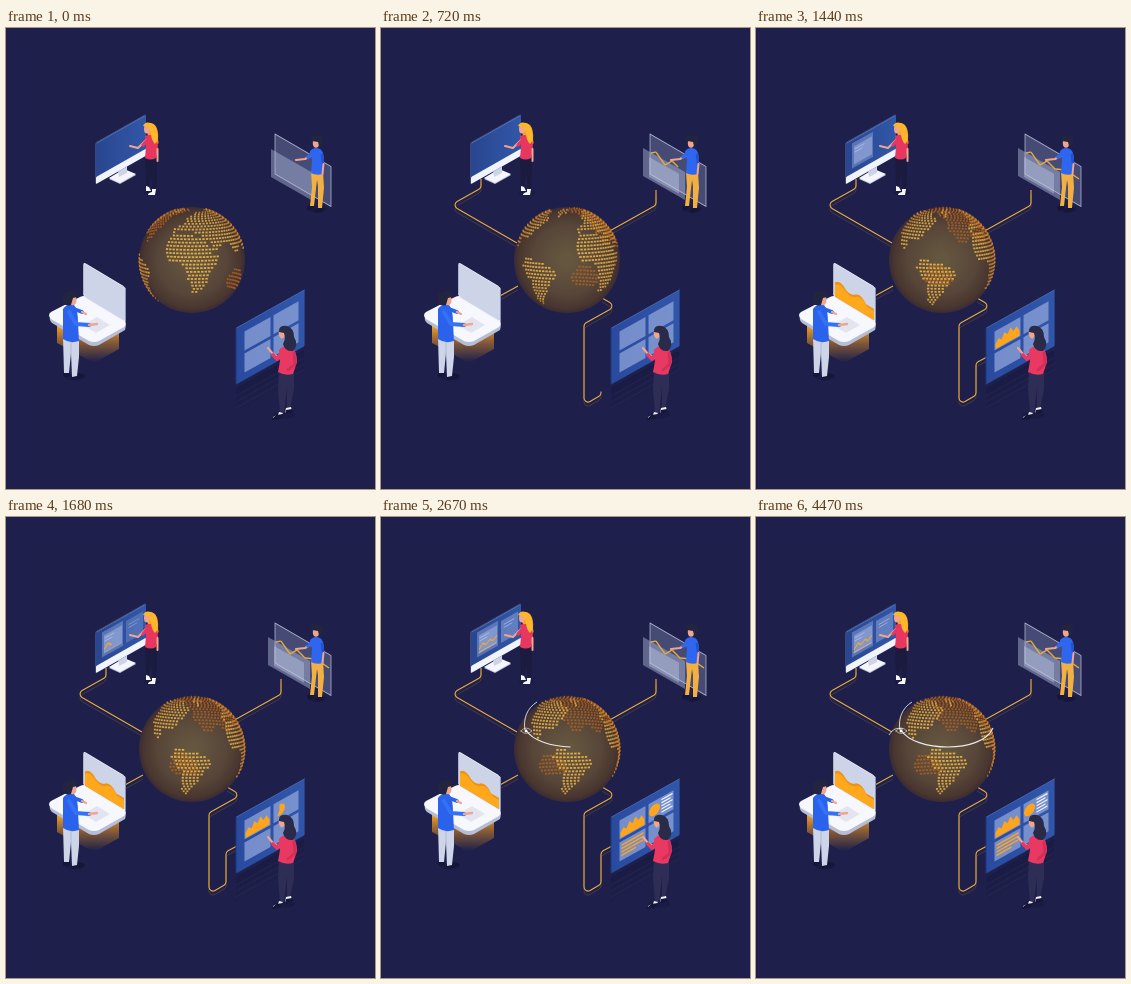
An HTML page with a canvas for the animation above (4.5 s loop, 369x461 px).

```html
<!DOCTYPE html>
<html lang="en">
<head>
<meta charset="utf-8">
<title>Connected globe</title>
<style>
html, body { margin: 0; width: 100%; height: 100%; overflow: hidden; background: #1e204b; }
canvas { display: block; }
</style>
</head>
<body>
<canvas id="stage" width="369" height="461"></canvas>
<script>
const ctx = document.getElementById('stage').getContext('2d');
const LOOP = 4500, RAD = Math.PI / 180;
const globe = { x: 186, y: 232, r: 53, tilt: 7 * RAD };
const amber = '#ffa51c', gold = '#e5aa3c', skin = '#f0a58f';
const hair = '#23243f', shoe = '#15163a', shade = 'rgba(14,15,48,.28)';

const progress = (t, from, to) => Math.min(1, Math.max(0, (t - from) / (to - from)));
const easeOut = p => 1 - (1 - p) * (1 - p);

function fill(color, d) {
  ctx.fillStyle = color;
  ctx.fill(new Path2D(d));
}
function line(color, width, d) {
  ctx.strokeStyle = color;
  ctx.lineWidth = width;
  ctx.stroke(new Path2D(d));
}
function oval(color, x, y, rx, ry = rx) {
  ctx.fillStyle = color;
  ctx.beginPath();
  ctx.ellipse(x, y, rx, ry, 0, 0, 7);
  ctx.fill();
}
function rect(color, x, y, w, h, r = 0) {
  ctx.fillStyle = color;
  ctx.beginPath();
  ctx.roundRect(x, y, w, h, r);
  ctx.fill();
}
function faded(alpha, draw) {
  if (alpha <= 0) return;
  ctx.save();
  ctx.globalAlpha *= alpha;
  draw();
  ctx.restore();
}
// Draws in the plane of an upright isometric panel.
function onPanel(x, y, slope, draw) {
  ctx.save();
  ctx.transform(1, slope, 0, 1, x, y);
  draw();
  ctx.restore();
}
// Lets a chart rise from its baseline.
function rising(baseline, height, draw) {
  if (!height) return;
  ctx.save();
  ctx.translate(0, baseline);
  ctx.scale(1, height);
  draw();
  ctx.restore();
}
function gradient(x0, y0, x1, y1, ...colors) {
  const g = ctx.createLinearGradient(x0, y0, x1, y1);
  colors.forEach((c, i) => g.addColorStop(i / (colors.length - 1), c));
  return g;
}
// Reveals the first `length` pixels of a polyline with rounded corners.
function trail(points, length, color, width, radius = 4) {
  if (length <= 0) return;
  ctx.save();
  ctx.lineCap = 'butt';
  ctx.setLineDash([length, 999]);
  ctx.beginPath();
  ctx.moveTo(...points[0]);
  for (let i = 1; i < points.length - 1; i++) ctx.arcTo(...points[i], ...points[i + 1], radius);
  ctx.lineTo(...points.at(-1));
  ctx.strokeStyle = color;
  ctx.lineWidth = width;
  ctx.stroke();
  ctx.restore();
}

// Land outlines as longitude, latitude pairs.
const land = [
  [-165,65, -130,71, -85,73, -60,55, -70,43, -82,30, -97,27, -97,18, -84,10, -105,20, -117,32, -125,48, -150,60],
  [-78,8, -52,4, -35,-7, -48,-27, -66,-54, -74,-50, -70,-18, -81,-4],
  [-55,82, -22,80, -25,70, -45,60, -55,70],
  [-16,16, -8,34, 11,37, 32,31, 43,12, 51,11, 38,-8, 34,-24, 20,-35, 9,0, 5,5, -8,5],
  [-9,37, -9,44, 2,50, 8,60, 25,71, 70,73, 110,76, 170,68, 140,55, 122,38, 120,25, 107,12, 100,14, 90,22, 78,8, 70,22, 57,26, 45,13, 35,32, 15,42],
  [114,-22, 131,-12, 142,-12, 153,-28, 140,-38, 116,-34]
];
function inside(p, lon, lat) {
  let hit = false;
  for (let i = 0, j = p.length - 2; i < p.length; j = i, i += 2) {
    const crosses = p[i + 1] > lat !== p[j + 1] > lat;
    if (crosses && lon < (p[j] - p[i]) * (lat - p[i + 1]) / (p[j + 1] - p[i + 1]) + p[i]) hit = !hit;
  }
  return hit;
}
const dots = [];
for (let lat = -54; lat <= 82; lat += 4) {
  const step = 4 / Math.cos(lat * RAD);
  for (let lon = -180; lon < 180; lon += step) {
    if (land.some(p => inside(p, lon, lat))) dots.push([lon * RAD, lat * RAD]);
  }
}

function drawGlobe(t) {
  const { x, y, r, tilt } = globe;
  const center = (18 - 83 * easeOut(progress(t, 0, 2400))) * RAD;
  const base = ctx.createRadialGradient(x, y, 6, x, y, r);
  base.addColorStop(0, '#65563f');
  base.addColorStop(.6, '#574639');
  base.addColorStop(.9, '#49362f');
  base.addColorStop(1, '#3a2b35');
  oval(base, x, y, r);
  const cosT = Math.cos(tilt), sinT = Math.sin(tilt);
  const project = ([lon, lat]) => {
    const d = lon - center, c = Math.cos(lat), s = Math.sin(lat);
    return {
      depth: sinT * s + cosT * c * Math.cos(d),
      px: x + r * c * Math.sin(d),
      py: y - r * (cosT * s - sinT * c * Math.cos(d))
    };
  };
  // The far side shows through, so it goes first.
  for (const { depth, px, py } of dots.map(project).sort((a, b) => a.depth - b.depth)) {
    const w = 1 + 1.5 * Math.abs(depth);
    ctx.globalAlpha = depth > 0 ? .65 + .35 * depth : .75;
    ctx.fillStyle = depth > .45 ? '#e3ae45' : depth > 0 ? '#cd8c36' : '#b9651f';
    ctx.fillRect(px - w / 2, py - .9, w, 1.8);
  }
  ctx.globalAlpha = 1;
}

const cables = [
  [[136,215], [70,177], [100,160], [100,151]],
  [[225,205], [275,177], [275,162]],
  [[137,258], [117,269]],
  [[221,270], [235,278], [203,296], [203,377], [220,367], [220,335], [231,329]]
];
function drawCables(t) {
  for (const c of cables) {
    ctx.save();
    ctx.translate(0, 4);
    trail(c, t * .2, 'rgba(140,100,55,.38)', 1);
    ctx.restore();
    trail(c, t * .2, gold, 1.15);
  }
}

function drawMonitor(t) {
  fill('#b9c2dc', 'M103 151L118 142L130 147L114 156Z');
  fill('#f5f6fc', 'M103 150L118 141L130 146L114 155Z');
  fill('#cdd4e8', 'M112 142L121 136L121 145L113 149Z');
  onPanel(90, 115, -.565, () => {
    rect('#3b4778', -1, -1, 51, 42, 2);
    rect(gradient(0, 0, 50, 0, '#29468f', '#3157a8'), 0, 0, 50, 35, 1);
    rect('#f2f4fb', 0, 34, 50, 7, 1);
    ctx.setLineDash([1, 1]);
    line('#6f86c1', .6, 'M1 .5H49');
    ctx.setLineDash([]);
    faded(progress(t, 1000, 1350), () => {
      rect('rgba(139,160,215,.5)', 6, 4, 21, 25);
      rect('rgba(185,202,240,.4)', 8, 8, 18, 18);
      line('#b9c8ec', .6, 'M9 11H18 M9 14H16');
    });
    faded(progress(t, 1450, 1800), () => {
      rect('rgba(139,160,215,.55)', 30, 6, 17, 22);
      line('#b4c4ea', .6, 'M33 11H43 M33 14H41');
    });
    const p = progress(t, 1550, 1880);
    trail([[8,22], [12,18], [15,21], [19,18], [22,21], [26,18]], p * 27, amber, 1.2, 0);
    faded(p, () => line('#efb45a', .8, 'M8 25H25'));
  });
}

function drawBlonde() {
  oval(shade, 146, 165, 8, 2.5);
  fill('#1b1b40', 'M139 128L151 128L151 145L150 162L147 162L145 145L143 159L140 158Z');
  fill('#f8f8fc', 'M140 158L143 159L145 163L140 163Z M146 161L150 161L149 167L142 167Q142 165 146 164Z');
  fill('#f5a51f', 'M139 97Q144 93 149 97Q153 102 152 112Q154 117 149 117L143 111Z');
  fill('#e7375f', 'M139 108Q143 106 148 108Q152 111 152 121L150 130Q145 133 139 130L140 119Z');
  line(skin, 2, 'M140 112L132 120L124 118');
  line('#e7375f', 3.2, 'M142 111L137 117');
  line(skin, 2, 'M151.5 121L151.5 133');
  oval(skin, 141, 101, 3, 4.5);
  fill('#ffb52c', 'M137 98Q139 93 145 95Q150 97 151 104Q153 113 149 116Q145 112 145 105Q144 100 141 99Z');
}

function drawGlass(t) {
  onPanel(269, 106, .58, () => {
    rect('rgba(154,166,204,.32)', 0, 0, 56, 40, 1);
    line('rgba(224,230,247,.7)', .8, 'M0 0H56V40H0Z');
  });
  const shift = 3 * easeOut(progress(t, 250, 600));
  onPanel(265 - shift, 121 - shift * .3, .57, () => rect('rgba(176,187,219,.45)', 0, 0, 42, 28));
  faded(progress(t, 300, 650), () => {
    onPanel(268, 129, .56, () => rect('rgba(194,204,231,.4)', 0, 0, 30, 20));
  });
  const p = progress(t, 420, 980);
  trail([[270,125], [275,124], [284,137], [291,133], [299,141], [310,142], [323,151]], p * 68, gold, 1.4, 1);
}

function drawGlassMan() {
  oval(shade, 311, 181, 10, 3.5);
  fill(shoe, 'M301 178L308 177L308 181Q304 183 301 181Z M309 181L316 179L318 182Q313 186 308 184Z');
  fill('#f2af42', 'M305 143L317 143L318 160L316 180L312 180L312 158L311 152L308 178L304 178L306 159Z');
  line(skin, 2.2, 'M306 127L299 131L290 132');
  fill('#2f66ef', 'M304 123Q308 118 314 121Q318 123 318 133L317 146Q310 148 305 145L306 132Z');
  line('#2f66ef', 3.6, 'M306 125L302 129');
  line('#2452cb', 2.6, 'M316 127L317 135');
  line(skin, 2, 'M317.5 136L316.5 146');
  oval(skin, 310, 115, 3.2, 4.8);
  fill(hair, 'M305 113Q304 107 311 107Q318 107 317 114Q316 119 313 118L312 114L306 113Z');
}

function drawDesk(t) {
  const glow = gradient(0, 298, 0, 334, 'rgba(250,169,38,.95)', 'rgba(240,150,34,.45)', 'rgba(240,150,34,0)');
  fill(glow, 'M51 294L88 315L113 301L113 321L88 335L51 315Z');
  fill('#b6bed7', 'M45 286L74 271Q78 269 82 271L118 293Q121 296 119 302L93 317Q88 319 83 317L46 295Q42 292 45 286Z');
  fill('#f7f8fd', 'M45 284L74 269Q78 267 82 269L117 291Q122 295 118 299L93 313Q88 315 83 313L45 291Q41 287 45 284Z');
  fill('#e2e5f0', 'M77 297L91 289L104 297L90 305Z');
  onPanel(78, 235, .6, () => {
    rect('#f1f3fb', -.7, -.7, 42.4, 35.4, 3);
    rect('#8794b8', 41, 0, 1, 34, 1);
    rect('#cdd4e8', 0, 0, 41, 33.5, 2);
    rising(33, easeOut(progress(t, 780, 1320)), () => {
      fill('#ee9214', 'M1 0V-14Q6 -20 11 -14Q16 -9 22 -15Q28 -18 32 -11L40 -11V0Z');
      fill('#ffa81c', 'M1 0V-12Q6 -17 11 -12Q17 -7 23 -13Q29 -16 33 -9L40 -9V0Z');
    });
  });
}

function drawDeskMan() {
  oval(shade, 69, 349, 10, 3.5);
  fill(shoe, 'M57 344L64 344L64 348Q59 350 57 348Z M65 348L73 345L79 347Q77 351 66 352Z');
  fill('#ced5e8', 'M57 309L73 309L73 329L71 348L66 349L65 325L63 345L58 345Z');
  line('#a9b4d1', .8, 'M65 314L65 326');
  line('#2863e8', 3.8, 'M68 281L76 284');
  line(skin, 2.2, 'M76 284L80 286');
  fill('#2a62ec', 'M57 281Q61 275 68 277Q72 281 72 295L73 313Q64 316 57 311Z');
  line('#3471f6', 4, 'M63 284L70 296L83 297');
  line(skin, 2.4, 'M83 297L91 296');
  oval(skin, 67, 272, 3.6, 5.2);
  fill(hair, 'M57 269Q56 263 65 263Q73 262 71 269L67 270L65 277Q59 279 57 274Z');
}

function drawBoard(t) {
  onPanel(230, 360, -.56, () => {
    rect(gradient(0, 0, 0, 27, 'rgba(14,15,49,.28)', 'rgba(14,15,49,0)'), 0, 0, 68, 27);
    line('rgba(75,83,135,.2)', .7, 'M0 8H68 M0 14H68 M0 20H68');
  });
  onPanel(230.5, 300, -.56, () => {
    rect('#1d3678', -1, -.5, 69, 57, 1);
    rect(gradient(0, 0, 68, 0, '#294a9f', '#3156a9'), 0, 0, 68, 56, 1);
    line('#5371b9', .6, 'M0 0H68');
    const card = 'rgba(154,174,222,.68)';
    for (const y of [8, 30]) {
      rect(card, 8, y, 26, 19);
      rect(card, 37, y, 25, 19);
    }
    rising(26, easeOut(progress(t, 1080, 1400)), () => {
      fill(amber, 'M9 0V-5L12 -9L15 -6L18 -12L21 -8L24 -13L27 -8L30 -11L33 -5V0Z');
    });
    const pie = progress(t, 1500, 1820);
    if (pie) {
      ctx.fillStyle = amber;
      ctx.beginPath();
      ctx.moveTo(43, 17);
      ctx.arc(43, 17, 5.5, -1.57, -1.57 + 6.283 * pie);
      ctx.fill();
    }
    for (let i = 0; i < 5; i++) {
      const p = progress(t, 1700 + i * 110, 1960 + i * 110);
      rect('#f5f7ff', 50, 10 + i * 3.1, (i % 2 ? 9 : 11) * p, 1.3);
    }
    for (let i = 0; i < 4; i++) {
      const p = progress(t, 2130 + i * 100, 2380 + i * 100);
      rect(amber, 10, 33 + i * 3.4, (i === 3 ? 15 : 22) * p, 1.6);
    }
  });
}

function drawBoardWoman() {
  oval(shade, 278, 387, 11, 3.5);
  fill('#2e2d56', 'M273 341L288 341L288 361L284 381L281 381L281 359L278 385L274 385L272 361Z');
  fill('#f2eff4', 'M273 384L277 385L274 389L267 390Q267 388 272 387Z M280 380L285 379L286 383L279 385Z');
  fill(shoe, 'M270 387L277 386L274 391L265 392Z M280 382L286 381L287 384L279 386Z');
  line(skin, 2.2, 'M273 330L267 326L262 320');
  fill('#e93861', 'M273 322Q278 316 285 319Q291 322 291 334L287 346Q279 348 272 344L274 333Z');
  line('#e93861', 3.7, 'M276 325L271 331L267 327');
  line('#cf3059', 2.8, 'M288 325L289 336L282 342');
  oval(skin, 276, 305, 3.3, 5.4);
  fill('#2a2a49', 'M273 302Q274 297 281 298Q288 300 288 309Q293 317 287 323Q279 324 277 316Q280 311 278 305L273 304Z');
}

function drawOrbit(t) {
  const front = t < 2670
    ? .46 * progress(t, 2260, 2670)
    : .46 + .54 * easeOut(progress(t, 2670, 3700));
  const reveal = (d, length, p, width) => {
    if (!p) return;
    ctx.save();
    ctx.lineCap = 'butt';
    ctx.setLineDash([length * p, 999]);
    line('rgba(255,255,255,.88)', width, d);
    ctx.restore();
  };
  reveal('M144 213C142 202 146 191 156 185', 33, progress(t, 2260, 2660), .9);
  reveal('M145 213C158 235 226 237 237 211', 107, front, 1.1);
  reveal('M147 212Q138 209 133 218', 18, progress(t, 2700, 3200), .8);
  if (t > 2300) {
    const pulse = .5 + .5 * Math.sin(t / 140);
    line(`rgba(255,255,255,${.45 + .35 * pulse})`, .8, 'M140 214Q145 208 151 214Q145 219 140 214Z');
    oval('#fff', 145, 214, 1.2 + .3 * pulse);
  }
}

function frame(now) {
  const t = now % LOOP;
  ctx.lineCap = ctx.lineJoin = 'round';
  ctx.fillStyle = '#1e204b';
  ctx.fillRect(0, 0, 369, 461);
  drawCables(t);
  drawGlobe(t);
  drawMonitor(t);
  drawBlonde();
  drawGlass(t);
  drawGlassMan();
  drawDesk(t);
  drawDeskMan();
  drawBoard(t);
  drawBoardWoman();
  drawOrbit(t);
  requestAnimationFrame(frame);
}
frame(0);
</script>
</body>
</html>
```
